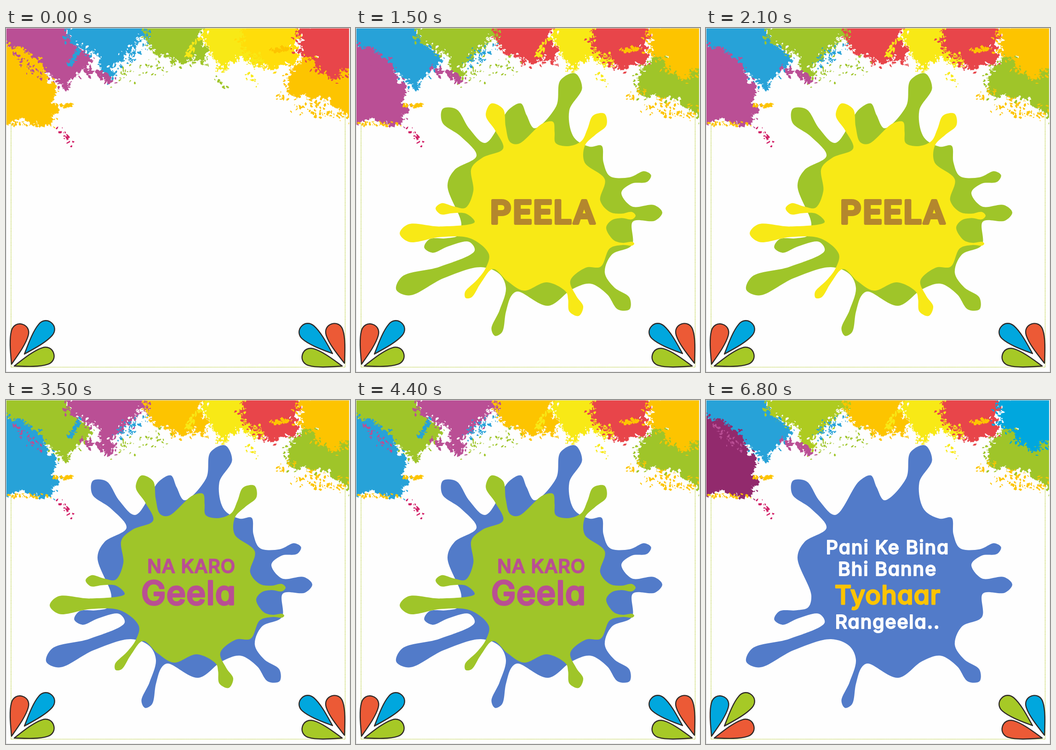
These frames come from a looping animation (748x748 px, 8 s). An HTML page:

```html
<!DOCTYPE html>
<html lang="hi-Latn">
<head>
<meta charset="utf-8">
<title>Festival colours</title>
<style>
html, body { margin: 0; width: 100%; height: 100%; overflow: hidden; background: #fefefe; }
svg {
  display: block; width: 100%; height: 100%;
  --orange: #fdc400; --blue: #27a2d8; --purple: #ba4f95; --green: #9fc529; --red: #e8454a;
  --gold: #ffdd0a; --yellow: #f8e916; --sky: #00a7de; --coral: #ec5a36; --lime: #a6c926;
  --ink: #527bc9; --magenta: #d11f66;
  animation: scene 8s step-end infinite;
}
@keyframes scene {
  /* Powder, from left to right */
  0%, 31.25% {
    --a: var(--orange); --b: var(--purple); --c: var(--blue); --d: var(--green);
    --f: var(--gold); --g: var(--red); --h: var(--orange);
  }
  6.25%, 43.75% {
    --a: var(--blue); --b: var(--green); --c: var(--purple); --d: var(--orange);
    --f: var(--red); --g: var(--orange); --h: var(--green);
  }
  18.75% {
    --a: var(--purple); --b: var(--blue); --c: var(--green); --d: var(--red);
    --f: var(--red); --g: var(--orange); --h: var(--green);
  }
  62.5%, 100% {
    --a: #922a6d; --b: var(--blue); --c: #aecb20; --d: var(--orange);
    --f: var(--red); --g: var(--sky); --h: var(--green);
  }
  /* Petals */
  0%, 18.75%, 43.75% { --p1: var(--coral); --p2: var(--sky); --p3: var(--lime); }
  6.25%, 31.25%, 62.5%, 100% { --p1: var(--sky); --p2: var(--lime); --p3: var(--coral); }
  /* Splats */
  0% { --big: none; --mid: none; --small: none; }
  6.25% { --big: var(--green); --mid: none; --small: none; }
  18.75% { --big: var(--green); --mid: var(--yellow); --small: none; }
  31.25% { --big: var(--green); --mid: var(--yellow); --small: var(--ink); }
  43.75% { --big: var(--ink); --mid: var(--green); --small: none; }
  62.5%, 100% { --big: var(--ink); --mid: none; --small: none; }
}
@keyframes harra { 0%, 18.75%, 100% { opacity: 0 } 6.25% { opacity: 1 } }
@keyframes peela { 0%, 31.25%, 100% { opacity: 0 } 18.75% { opacity: 1 } }
@keyframes neela { 0%, 43.75%, 100% { opacity: 0 } 31.25% { opacity: 1 } }
@keyframes geela { 0%, 62.5%, 100% { opacity: 0 } 43.75% { opacity: 1 } }
@keyframes rangeela { 0% { opacity: 0 } 62.5%, 100% { opacity: 1 } }

.petals { stroke: #2f2927; stroke-width: 2.4; stroke-linejoin: round; }
.words { text-anchor: middle; stroke-linejoin: round; opacity: 0; animation: 8s step-end infinite; }
.brush { font: 500 70px Roboto, "Liberation Sans", sans-serif; letter-spacing: .065em; stroke-width: 6; }
.soft { font: 500 41px Inter, "Open Sans", sans-serif; font-feature-settings: "cv11"; letter-spacing: .045em; }
.soft text { stroke-width: .05em; }
.harra { fill: #2d6017; stroke: #2d6017; animation-name: harra; }
.peela { fill: #b4872d; stroke: #b4872d; animation-name: peela; }
.neela { fill: #fefefe; stroke: #fefefe; font-size: 67px; letter-spacing: .04em; animation-name: neela; }
.geela { fill: #b94f93; stroke: #b94f93; letter-spacing: .02em; animation-name: geela; }
.geela .hot { font-size: 72px; letter-spacing: .015em; }
.rangeela { fill: #fefefe; stroke: #fefefe; animation-name: rangeela; }
.rangeela .hot { fill: #fdc400; stroke: #fdc400; font-size: 56px; letter-spacing: .02em; }
</style>
</head>
<body>
<svg viewBox="0 0 748 748" preserveAspectRatio="none">
  <defs>
    <clipPath id="stage"><rect x="1" y="1" width="745" height="746"/></clipPath>
    <path id="petal" d="M0 0C-8 -22 -19 -50 -19 -70C-19 -82 -11 -90 0 -90C11 -90 19 -82 19 -70C19 -50 8 -22 0 0Z"/>
  </defs>
  <rect x=".5" y=".5" width="747" height="747" fill="#fefefe" stroke="#dcdcdc"/>
  <path d="M11 60V737.5H737.5V60" fill="none" stroke="#b9cd3c" stroke-width="1.6" stroke-dasharray="1.6 1.5"/>
  <g id="powder" clip-path="url(#stage)"></g>
  <g id="splats"></g>
  <g class="petals">
    <g fill="var(--p1)">
      <use href="#petal" transform="translate(12 731) rotate(15)"/>
      <use href="#petal" transform="translate(736 729) rotate(-18)"/>
    </g>
    <g fill="var(--p2)">
      <use href="#petal" transform="translate(40 709) rotate(41)"/>
      <use href="#petal" transform="translate(710 708) rotate(-49)"/>
    </g>
    <g fill="var(--p3)">
      <use href="#petal" transform="translate(18 735) rotate(72)"/>
      <use href="#petal" transform="translate(731 735) rotate(-74)"/>
    </g>
  </g>
  <g class="words brush harra"><text x="407" y="421">HARRA</text></g>
  <g class="words brush peela"><text x="408" y="424.5">PEELA</text></g>
  <g class="words brush neela"><text x="408" y="419.5">NEELA</text></g>
  <g class="words soft geela">
    <text x="403" y="376">NA KARO</text>
    <text class="hot" x="397" y="445">Geela</text>
  </g>
  <g class="words soft rangeela">
    <text x="395" y="335">Pani Ke Bina</text>
    <text x="394.5" y="381.5">Bhi Banne</text>
    <text class="hot" x="395" y="443.5">Tyohaar</text>
    <text x="395" y="496.5">Rangeela..</text>
  </g>
</svg>
<script>
let seed = 7;
const rnd = () => (seed = (seed * 16807) % 2147483647) / 2147483647;
const scatter = spread => (rnd() + rnd() - 1) * spread;
const mix = (p, q, t) => [p[0] + (q[0] - p[0]) * t, p[1] + (q[1] - p[1]) * t];
const dist = (p, q) => Math.hypot(q[0] - p[0], q[1] - p[1]);
const read = text => text.trim().split(/\s+/).map(p => p.split(',').map(Number));
const polygon = pts => 'M' + pts.map(p => p.map(v => v.toFixed(1)).join(' ')).join('L') + 'Z';

function paint(layer, fill, d) {
  const path = document.createElementNS('http://www.w3.org/2000/svg', 'path');
  path.setAttribute('d', d);
  path.style.fill = `var(--${fill})`;
  document.getElementById(layer).append(path);
}

// Closed centripetal curve through the points
function spline(pts) {
  const n = pts.length;
  const handle = (prev, at, next) => {
    const s = Math.sqrt(dist(prev, at)), t = Math.sqrt(dist(at, next));
    return at.map((v, i) =>
      (s * s * next[i] - t * t * prev[i] + (2 * s * s + 3 * s * t + t * t) * v) / (3 * s * (s + t)));
  };
  return 'M' + pts[0] + pts.map((p, i) => {
    const before = pts[(i + n - 1) % n], q = pts[(i + 1) % n], after = pts[(i + 2) % n];
    return 'C' + [handle(before, p, q), handle(after, q, p), q].join(' ');
  }).join('') + 'Z';
}

// "x,y" is a point of the outline, "x,y,r" a round drop at the end of an arm
function splat(fill, text) {
  const parts = read(text), n = parts.length;
  paint('splats', fill, spline(parts.flatMap((part, i) => {
    const [x, y, r] = part;
    if (!r) return [part];
    const root = mix(parts[(i + n - 1) % n], parts[(i + 1) % n], .5), len = dist(root, part);
    const ux = (x - root[0]) / len, uy = (y - root[1]) / len;
    const at = (along, side) => [x + ux * along - uy * side, y + uy * along + ux * side];
    const drop = [at(0, -r), at(r, 0), at(0, r)];
    return len > 3 * r ? [at(-len / 2, -r * .6), ...drop, at(-len / 2, r * .6)] : drop;
  })));
}

// Small irregular chip
function fleck([cx, cy], size) {
  const turn = rnd() * 2 * Math.PI, r = size * (.3 + rnd() * .8), thin = .35 + rnd() * .4;
  const cos = Math.cos(turn), sin = Math.sin(turn);
  return polygon(Array.from({ length: 8 }, (_, k) => {
    const m = r * (.55 + rnd() * .75), u = Math.cos(k * Math.PI / 4) * m, v = Math.sin(k * Math.PI / 4) * m * thin;
    return [cx + u * cos - v * sin, cy + u * sin + v * cos];
  }));
}

// Flecks strewn along a line
function cloud(fill, from, to, spread, count, size = 4) {
  let d = '';
  while (count--) {
    const [x, y] = mix(from, to, rnd());
    d += fleck([x + scatter(spread), y + scatter(spread)], size);
  }
  paint('powder', fill, d);
}

// Powder with a torn edge and flecks around it
function torn(fill, text, count) {
  let pts = read(text);
  for (let k = 0; k < 6; k++) {
    pts = pts.flatMap((p, i) => {
      const q = pts[(i + 1) % pts.length], len = dist(p, q) || 1;
      const off = (rnd() - .5) * Math.min(len, 15) * 1.2 / len;
      const [x, y] = mix(p, q, .5);
      return [p, [x - (q[1] - p[1]) * off, y + (q[0] - p[0]) * off]];
    });
  }
  let d = polygon(pts);
  while (count--) {
    const [x, y] = pts[Math.floor(rnd() * pts.length)];
    d += fleck([x + scatter(13), y + scatter(13)], 4.5);
  }
  paint('powder', fill, d);
}

torn('b', '-15,-15 140,-15 150,42 190,72 155,95 132,135 105,110 60,80 -15,45', 70);
torn('c', '130,-15 128,25 165,45 200,62 222,110 240,75 285,35 318,25 318,-15', 90);
torn('a', '-15,38 50,50 80,92 110,130 102,205 -15,205', 80);
torn('yellow', '425,-15 435,40 467,92 505,62 550,85 570,-15', 80);
torn('d', '313,-15 310,35 358,82 432,80 430,-15', 70);
torn('f', '512,-15 512,40 555,60 558,88 625,82 642,-15', 80);
torn('h', '615,105 650,60 765,75 765,205 705,150 618,145', 130);
torn('g', '640,-15 640,45 715,112 765,80 765,-15', 110);

cloud('purple', [10, 50], [70, 100], 15, 40);
cloud('purple', [165, 85], [232, 115], 12, 50, 6);
cloud('blue', [135, 88], [158, 45], 7, 26, 6);
cloud('blue', [242, 78], [310, 35], 21, 64);
cloud('green', [240, 110], [345, 78], 26, 55, 3.5);
cloud('yellow', [392, 62], [420, 22], 7, 24, 6);
cloud('yellow', [525, 95], [545, 125], 12, 14);
cloud('green', [455, 110], [482, 128], 8, 9);
cloud('orange', [575, 46], [612, 46], 6, 24, 6);
cloud('orange', [590, 150], [630, 135], 13, 26);
cloud('orange', [640, 165], [738, 188], 25, 80, 4.5);
cloud('orange', [105, 170], [146, 169], 5, 30, 5);
cloud('orange', [5, 207], [100, 210], 7, 36);
cloud('magenta', [116, 215], [142, 252], 10, 14, 5);

splat('big', `262,278 203,191,21 281,250 352,183,20 388,218 468,122,25 474,238 508,258 534,256
  538,292 552,322 630,323,12 577,358 600,388 649,402,17 602,421 600,472 556,493 541,532 582,599,18
  510,556 470,568 418,604 351,573 338,582 306,658,12 326,565 312,535 272,520 108,561,22 258,484
  246,465 163,474,15 222,451 229,425 199,342 214,309`);
splat('mid', `251,305 275,282 320,262 301,183,20 335,248 353,252 419,217,16 434,250 460,257 490,246
  530,201,18 498,255 497,292 541,329 531,375 552,400 600,408,8 556,418 544,434 560,461 601,469,4
  552,479 532,519 500,521 466,550 479,611,16 457,574 415,553 365,571 330,551 298,524 244,580,9
  282,522 289,492 250,458 114,446,19 258,422 240,404 185,393,12 238,391 255,355`);
splat('small', `287,285 268,261,8 303,280 328,266 350,239 378,265 399,254 411,265 432,256 463,203,17
  450,272 487,281 497,317 535,308,11 513,328 554,384 531,418 548,437 587,449,16 528,458 520,491
  484,493 480,518 486,544,10 462,518 437,514 434,538 438,569,14 410,542 378,563 356,532 330,536
  308,590,12 316,532 303,511 260,502 250,478 262,430 211,411,13 262,404 262,385 242,364,9 270,364
  280,345 270,317,8 288,300`);
</script>
</body>
</html>
```
